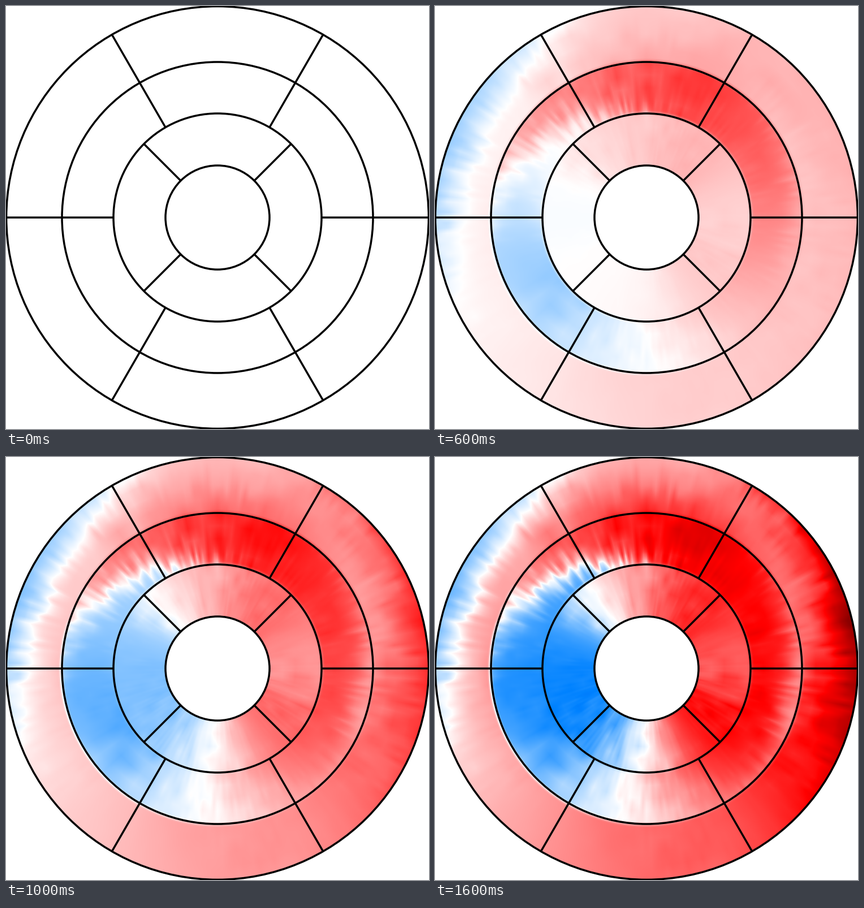
Recreate the animation shown at these times as a matplotlib script. Size 748x748 px, loop 1.8 s.

```python
import numpy as np
import matplotlib.pyplot as plt
from matplotlib.animation import FuncAnimation
from matplotlib.patches import Circle

SIZE, DPI = 748, 100
MID = SIZE / 2
RADII = (92, 184, 275, 373.4)
STEPS, INTERVAL = 9, 200
LINE = 3.5 * 72 / DPI

# Key points of each ring: clock hour, depth across the ring (0 to 1),
# first level and last level (100 is pure red, -100 pure blue).
INNER = [(0.1, 0.5, 15, 52), (1.2, 0.5, 17, 98), (2.7, 0.5, 6, 60),
         (4.5, 0.5, 3, 104), (6.1, 0.5, 1, 14), (7.3, 0.5, 27, -106),
         (9.4, 0.5, 20, -95), (11.1, 0.5, 17, 4)]
MIDDLE = [(0.3, 0.6, 72, 112), (2.0, 0.5, 60, 101), (3.1, 0.3, 35, 99),
          (3.2, 1.0, 28, 35), (4.3, 0.4, 10, 105), (5.5, 0.5, 3, 42),
          (6.7, 0.6, -14, -20), (8.0, 0.4, -36, -98), (9.4, 0.4, 0, -90),
          (10.2, 0.0, 22, -80), (10.9, 0.7, 42, 70)]
OUTER = [(0.2, 0.8, 18, 26), (0.1, 0.0, 24, 94), (1.4, 0.5, 30, 60),
         (2.2, 0.15, 14, 52), (2.5, 0.9, 0, 145), (3.6, 0.5, 6, 100),
         (5.6, 0.5, 9, 62), (7.3, 0.6, 3, 50), (8.2, 0.6, -3, 4),
         (9.0, 0.25, 0, 48), (10.0, 0.85, -36, -62), (10.3, 0.1, -4, 32),
         (11.4, 0.5, 18, 62)]


def smoothstep(x):
    x = np.clip(x, 0, 1)
    return x * x * (3 - 2 * x)


def noise(rng, row, col, cols):
    """Random values blended over a grid that wraps around the circle."""
    grid = rng.uniform(-1, 1, (16, cols))
    i, j = row.astype(int), col.astype(int)
    u, v = row - i, col - j
    j, k = j % cols, (j + 1) % cols
    low = grid[i, j] * (1 - v) + grid[i, k] * v
    high = grid[i + 1, j] * (1 - v) + grid[i + 1, k] * v
    return low * (1 - u) + high * u


def blend(points, hour, depth, spread=0.75, stretch=2.5):
    """Average of the key levels, weighted by nearness."""
    total = first = last = 0
    for h, d, a, b in points:
        dh = (hour - h + 6) % 12 - 6
        dd = stretch * (depth - d)
        weight = np.exp(-(dh ** 2 + dd ** 2) / (2 * spread ** 2))
        total = total + weight
        first = first + weight * a
        last = last + weight * b
    return first / total, last / total


def build_fields():
    """First and last state of the whole disc, with ragged radial teeth."""
    rng = np.random.default_rng(7)
    y, x = np.mgrid[:SIZE, :SIZE] + 0.5 - MID
    r = np.hypot(x, y)
    hour = np.arctan2(x, -y) * 6 / np.pi % 12
    across = np.interp(r, RADII, range(4))
    teeth = noise(rng, across * 2.5, hour * 20, 240)
    patches = noise(rng, across * 4, hour * 5, 60)
    rough_hour = hour + 0.18 * patches + 0.06 * teeth

    first = last = 0
    for ring, points in enumerate((INNER, MIDDLE, OUTER)):
        depth = np.clip(across - ring, 0, 1) + 0.13 * teeth
        a, b = blend(points, rough_hour, depth)
        enter = smoothstep((r - RADII[ring]) / 12 + 0.4) if ring else 1
        first = first * (1 - enter) + a * enter
        last = last * (1 - enter) + b * enter

    inside = (r > RADII[0]) & (r < RADII[3])
    gain = inside * (1 + 0.08 * patches + 0.03 * teeth)
    return first * gain, last * gain


FIRST, LAST = build_fields()


def colorize(value):
    stops = (-120, -100, 0, 100, 145)
    channels = ((0, 0, 255, 255, 139),
                (110, 130, 255, 0, 0),
                (248, 255, 255, 0, 0))
    rgb = [np.interp(value, stops, c) for c in channels]
    return np.stack(rgb, axis=-1).astype(np.uint8)


def render(step):
    if step == 0:
        return colorize(np.zeros_like(FIRST))
    growth = smoothstep((step - 1) / (STEPS - 2))
    return colorize(FIRST + (LAST - FIRST) * growth)


fig = plt.figure(figsize=(SIZE / DPI, SIZE / DPI), dpi=DPI, facecolor="white")
ax = fig.add_axes([0, 0, 1, 1])
image = ax.imshow(render(0), extent=(0, SIZE, SIZE, 0), interpolation="nearest")
ax.set(xlim=(0, SIZE), ylim=(SIZE, 0))
ax.axis("off")

for radius in RADII:
    ax.add_patch(Circle((MID, MID), radius, fill=False, ec="black", lw=LINE))


def spoke(degrees, start, end):
    a = np.radians(degrees)
    ends = np.array([start, end])
    ax.plot(MID + ends * np.cos(a), MID + ends * np.sin(a), color="black",
            lw=LINE, solid_capstyle="butt", snap=False)


for angle in range(45, 360, 90):
    spoke(angle, RADII[0], RADII[1])
for angle in range(0, 360, 60):
    spoke(angle, RADII[1], RADII[3])


def update(step):
    image.set_data(render(step))
    return [image]


anim = FuncAnimation(fig, update, frames=STEPS, interval=INTERVAL,
                     repeat=True, repeat_delay=0, blit=False)
plt.show()
```
